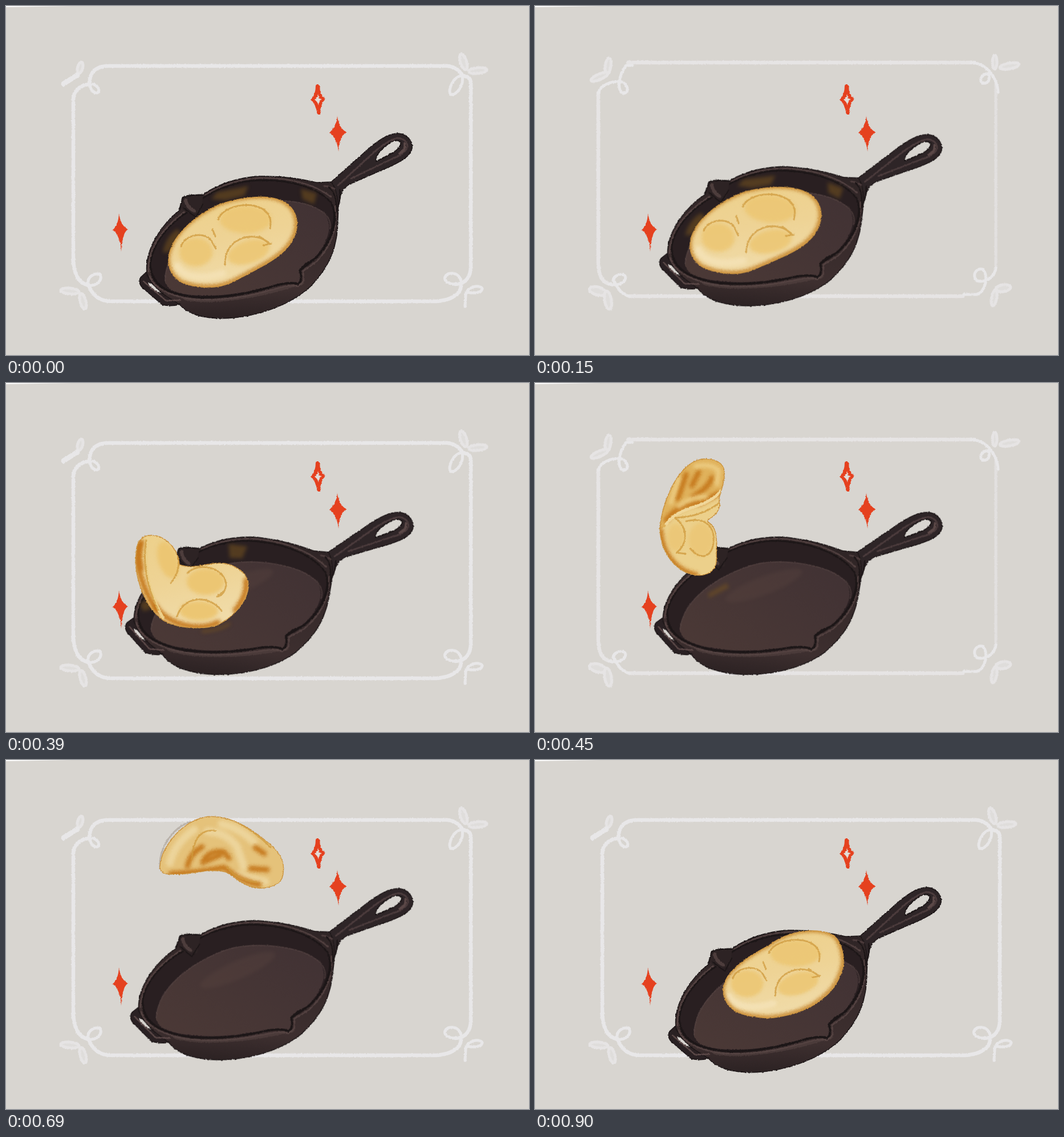
Write an HTML page that moves like this. It is 917 by 611 pixels and loops after 1050 ms.

```html
<!DOCTYPE html>
<html lang="en">
<head>
<meta charset="utf-8">
<title>Pancake flip</title>
<style>
html, body { margin: 0; width: 100%; height: 100%; overflow: hidden; background: #d8d5d0; }
svg { display: block; width: 917px; height: 611px; }
path, ellipse { stroke-linecap: round; stroke-linejoin: round; }
.line { fill: none; }

.border { fill: none; stroke: #e8e7e8; stroke-width: 6.5; filter: url(#chalk); }
.curl { stroke-width: 5; }
.petal { stroke-width: 5; stroke: #e6e4e4; fill: #dfdddb; }
.spark { fill: #e5411f; filter: url(#chalk); }

.soft { filter: url(#soft); }
.crust { fill: none; stroke: #cb9440; stroke-width: 1.5; }
.edge { fill: none; stroke: #c07a1c; stroke-width: 6; filter: url(#soft); }
.crease { fill: none; stroke: #cf9a3c; stroke-width: 3; opacity: .75; }
.toast { fill: none; stroke: #c4761a; stroke-width: 9; filter: url(#soft); }
.rim { fill: none; stroke: #5b4847; }
.dark { fill: none; stroke: #1c1617; }
.glow { fill: #76531f; opacity: .55; filter: url(#soft); }

.odd, .even, .pan, .flat, .slot { animation: 1050ms step-end infinite; }
.odd { animation-name: odd; }
.even { animation-name: even; }
.pan { animation-name: tilt; transform-origin: 661px 262px; }
.flat { animation-name: flat; }
.slot { animation-name: slot; animation-delay: calc(var(--at) * 150ms - 1050ms); }

@keyframes odd {
  0%, 28.571%, 57.142%, 85.714% { opacity: 1; }
  14.2857%, 42.857%, 71.428% { opacity: 0; }
}
@keyframes even {
  0%, 28.571%, 57.142%, 85.714% { opacity: 0; }
  14.2857%, 42.857%, 71.428% { opacity: 1; }
}
@keyframes tilt {
  0%, 71.428%, 100% { transform: rotate(0deg); }
  14.2857%, 57.142% { transform: rotate(4.4deg); }
  28.571% { transform: rotate(7.3deg); }
}
@keyframes flat {
  0% { opacity: 1; }
  28.571%, 100% { opacity: 0; }
}
@keyframes slot {
  0% { opacity: 1; }
  14.2857%, 100% { opacity: 0; }
}
</style>
</head>
<body>
<svg viewBox="0 0 917 611">
  <defs>
    <filter id="chalk" filterUnits="userSpaceOnUse" x="0" y="0" width="917" height="611" color-interpolation-filters="sRGB">
      <feTurbulence type="fractalNoise" baseFrequency=".35" numOctaves="2" seed="4"/>
      <feDisplacementMap in="SourceGraphic" scale="3" xChannelSelector="R" yChannelSelector="G"/>
    </filter>
    <filter id="soft" filterUnits="userSpaceOnUse" x="0" y="0" width="917" height="611" color-interpolation-filters="sRGB">
      <feGaussianBlur stdDeviation="3"/>
    </filter>
    <linearGradient id="batter" x1="0" y1="0" x2=".3" y2="1">
      <stop offset="0" stop-color="#edd08a"/>
      <stop offset=".55" stop-color="#eed395"/>
      <stop offset="1" stop-color="#f0dba8"/>
    </linearGradient>
    <linearGradient id="wall" x1="0" y1="0" x2="0" y2="1">
      <stop offset="0" stop-color="#2e2425"/>
      <stop offset=".8" stop-color="#3d2f2f"/>
      <stop offset="1" stop-color="#2c2223"/>
    </linearGradient>
    <linearGradient id="floor" x1="0" y1="1" x2="1" y2="0">
      <stop offset="0" stop-color="#4b3936"/>
      <stop offset="1" stop-color="#413234"/>
    </linearGradient>
    <path id="cake-flat" d="M285 440C290 405 325 370 375 347C420 332 470 328 495 348C512 362 514 385 505 405C490 440 440 460 400 482C370 497 335 494 310 485C292 475 284 462 285 440Z"/>
    <path id="cake-land" d="M330 400C333 370 375 343 410 325C445 297 500 292 525 308C540 322 543 350 540 362C532 395 515 412 490 428C465 442 445 448 410 452C385 450 355 447 343 433C333 422 329 410 330 400Z"/>
    <path id="cake-fold" d="M228 300C228 275 240 264 262 267C285 272 303 295 304 318C325 326 345 318 365 316C395 312 425 330 425 355C424 385 395 412 370 424C345 432 300 430 275 415C255 400 240 375 232 345C227 325 226 312 228 300Z"/>
    <path id="cake-rise" d="M285 135C300 130 330 133 332 155C334 180 318 200 324 212C322 235 300 236 303 243C322 255 318 275 318 310C318 330 300 339 280 336C245 330 220 295 219 255C222 215 245 150 285 135Z"/>
    <path id="cake-top" d="M270 185C273 150 310 105 355 99C395 97 430 120 460 145C485 165 491 185 484 207C477 222 450 228 430 222C410 216 395 200 385 196C355 188 320 203 290 200C275 200 269 195 270 185Z"/>
    <path id="cake-drop" d="M463 128C463 120 475 121 490 133C520 150 540 190 543 230C544 270 535 300 522 315C510 328 490 333 470 330C455 325 452 310 444 290C441 270 455 258 470 245C485 230 495 215 495 200C497 180 468 155 463 128Z"/>
    <clipPath id="in-flat"><use href="#cake-flat"/></clipPath>
    <clipPath id="in-land"><use href="#cake-land"/></clipPath>
    <clipPath id="in-fold"><use href="#cake-fold"/></clipPath>
    <clipPath id="in-rise"><use href="#cake-rise"/></clipPath>
    <clipPath id="in-top"><use href="#cake-top"/></clipPath>
    <clipPath id="in-drop"><use href="#cake-drop"/></clipPath>
    <g id="bubbles">
      <g class="soft" fill="#ecc672" opacity=".85">
        <ellipse cx="420" cy="374" rx="45" ry="24"/>
        <ellipse cx="333" cy="431" rx="29" ry="25"/>
        <ellipse cx="425" cy="431" rx="38" ry="20" transform="rotate(-18 425 431)"/>
      </g>
      <path class="soft line" d="M300 455C310 475 345 480 380 468" stroke="#f3e0b3" stroke-width="13"/>
      <path class="crease" d="M372 374C383 340 474 335 463 389M307 421C314 398 354 393 363 416L368 425M384 453C382 405 437 391 462 416L444 403M362 391L367 403M451 419L465 416"/>
    </g>
  </defs>

  <path d="M0 0H115L0 2Z" fill="#fff"/>

  <g class="odd"><g class="border">
    <path d="M118 450V165C118 148 130 139 145 137M147 128C150 113 160 105 180 105H765C782 103 795 111 800 122C812 123 815 128 815 135V455C815 475 805 487 788 487M798 490C797 505 780 515 755 517H185C160 517 150 503 145 489C125 485 118 465 118 440"/>
    <path class="curl" d="M145 137C160 135 167 148 160 152C150 153 145 140 147 128M800 122C803 140 790 156 780 155C773 148 785 122 800 122M788 487C768 487 765 474 775 469C790 465 800 475 798 490M145 489C140 475 155 466 165 470C170 480 158 491 145 489"/>
    <ellipse class="petal" cx="130" cy="108" rx="4.5" ry="10" transform="rotate(15 130 108)"/>
    <path d="M101 136L125 121" stroke-width="9"/>
    <ellipse class="petal" cx="802" cy="98" rx="5.5" ry="14" transform="rotate(-18 802 98)"/>
    <ellipse class="petal" cx="827" cy="113" rx="16" ry="5" transform="rotate(-5 827 113)"/>
    <ellipse class="petal" cx="112" cy="499" rx="16" ry="5" transform="rotate(5 112 499)"/>
    <ellipse class="petal" cx="135" cy="517" rx="5" ry="14" transform="rotate(-15 135 517)"/>
    <path class="curl" d="M805 526L806 505C810 490 832 487 835 495C833 503 820 503 808 501"/>
  </g></g>

  <g class="even"><g class="border">
    <path d="M111 450V152M163 99H770M750 508H165M111 450C111 472 118 484 132 487" stroke="#e6e4e4"/>
    <path d="M808 135V458" stroke="#e2e0df" stroke-width="5"/>
    <path class="curl" d="M111 152C115 139 130 132 150 132C165 137 165 152 155 153C143 148 146 122 160 104H171M765 99C793 101 810 125 812 151M797 119C785 117 778 127 784 135C795 137 799 128 795 118M808 458C807 474 790 485 775 481C766 473 772 458 785 461C796 472 790 500 775 505H752M165 508C150 505 145 492 137 480C140 469 155 467 159 474C158 487 145 490 130 487"/>
    <ellipse class="petal" cx="128" cy="105" rx="5" ry="14" transform="rotate(8 128 105)"/>
    <ellipse class="petal" cx="113" cy="124" rx="16" ry="5" transform="rotate(-24 113 124)"/>
    <ellipse class="petal" cx="806" cy="98" rx="4" ry="12"/>
    <ellipse class="petal" cx="832" cy="105" rx="17" ry="5" transform="rotate(-10 832 105)"/>
    <ellipse class="petal" cx="110" cy="499" rx="15" ry="7" transform="rotate(15 110 499)"/>
    <ellipse class="petal" cx="128" cy="515" rx="6" ry="16" transform="rotate(-10 128 515)"/>
    <ellipse class="petal" cx="821" cy="494" rx="13" ry="6" transform="rotate(-8 821 494)"/>
    <ellipse class="petal" cx="805" cy="511" rx="4.5" ry="14" transform="rotate(10 805 511)"/>
  </g></g>

  <g class="pan">
    <g filter="url(#chalk)">
      <path d="M247 465L236 475Q231 484 239 493L274 523Q290 527 306 522L315 510L290 495Z" fill="#2a2123" stroke="#1c1617" stroke-width="1.5"/>
      <path d="M570 308L640 246C658 232 672 223 687 223C704 224 713 237 712 249C709 263 694 271 676 280L602 312Q590 320 587 331L581 358L540 330Z" fill="#2e2527" stroke="#1c1617" stroke-width="1.5"/>
      <path d="M582 372C582 420 569 454 534 491C500 522 440 547 375 547C340 546 316 537 304 522C278 508 253 490 247 468C242 425 276 379 305 357L309 336Q314 330 345 330C372 312 405 300 445 298C490 297 522 304 545 309L570 308Q585 326 582 372Z" fill="url(#wall)" stroke="#1c1617" stroke-width="1.5"/>
      <path d="M253 453C256 415 290 378 318 361L338 341C370 318 410 306 445 305C500 304 546 318 570 344C584 370 570 415 541 443Q512 457 515 463Q521 479 512 487Q501 482 474 489C425 505 380 511 340 510C290 508 256 492 253 453Z" fill="#291f21" stroke="#1c1617" stroke-width="3"/>
      <path d="M279 484C278 430 328 382 395 352C445 334 518 338 548 356C575 370 572 405 542 440Q512 457 515 463Q521 479 512 485Q501 480 474 487C425 502 380 508 340 507C305 505 285 500 279 484Z" fill="url(#floor)"/>
      <path class="rim" d="M279 482C278 430 328 382 395 352C445 334 518 338 548 356C564 364 571 378 568 390" stroke-width="2" opacity=".6"/>
      <path class="rim" d="M250 465C248 420 279 386 312 361M349 331C374 315 410 302 446 301C500 300 540 312 570 334M577 350C583 390 570 420 545 447L521 464L522 481L512 491C500 486 478 494 465 497C420 510 370 517 325 513C285 508 258 492 252 473" stroke-width="2.5" opacity=".8"/>
      <path class="rim" d="M315 513C360 521 430 511 485 495L520 485" stroke-width="5" opacity=".5"/>
      <path class="dark" d="M256 470C261 491 290 507 340 510C390 511 430 502 474 489Q501 482 512 487Q521 479 515 463L541 443C567 419 579 387 576 362" stroke-width="3.5"/>
      <path d="M309 335Q325 330 346 330L342 362Q320 369 307 353Z" fill="#2d2324"/>
      <path class="dark" d="M304 356L310 336Q314 331 345 331M311 353L333 370L345 347" stroke-width="2"/>
      <path class="rim" d="M315 340Q317 352 330 359" stroke-width="6" opacity=".7"/>
      <path d="M249 484L255 486L272 502L262 499L253 494Z" fill="#d8d5d0"/>
      <path class="rim" d="M241 482L281 516L306 515" stroke-width="2.5"/>
      <path d="M649 269Q648 258 672 240Q685 232 692 238Q694 246 680 256Q660 267 649 272Z" fill="#d8d5d0" stroke="#1c1617" stroke-width="2"/>
      <path class="rim" d="M582 314L642 259Q667 236 687 231Q704 233 704 247Q698 260 678 267L605 302M576 320Q570 317 558 315" stroke-width="3" opacity=".65"/>
      <path class="rim" d="M699 241Q701 252 690 258" stroke-width="4"/>
      <path class="dark" d="M566 317Q580 328 580 360M585 322Q587 338 582 352" stroke-width="2.5"/>
    </g>
    <ellipse class="soft" cx="415" cy="387" rx="72" ry="16" fill="#5a4540" opacity=".35" transform="rotate(-28 415 387)"/>
    <g class="flat"><path class="glow" d="M360 338L370 326L425 315L418 332L385 340ZM517 320L545 328L540 347L520 338ZM275 432Q280 403 301 390L308 400L286 430Z"/></g>
    <g class="slot" style="--at:2"><path class="glow" d="M395 316H428L422 338L400 340ZM254 440L266 430L276 445L262 452Z"/></g>
    <g class="slot" style="--at:3"><path class="glow" d="M320 413L350 391L355 398L322 421Z"/></g>
    <g class="slot" style="--at:5"><path class="glow" d="M510 322L550 333L548 345L522 334Z"/></g>

    <g class="flat">
      <g filter="url(#chalk)">
        <use href="#cake-flat" fill="url(#batter)"/>
        <g clip-path="url(#in-flat)">
          <use href="#bubbles"/>
          <use href="#cake-flat" class="edge" x="-1" y="-1"/>
        </g>
        <use href="#cake-flat" class="crust"/>
      </g>
    </g>
  </g>

  <g class="slot" style="--at:6">
    <g filter="url(#chalk)">
      <use href="#cake-land" fill="url(#batter)"/>
      <g clip-path="url(#in-land)">
        <use href="#bubbles" transform="translate(435 375) scale(.97 .93) translate(-398 -413)"/>
        <use href="#cake-land" class="edge" x="-1" y="-1"/>
      </g>
      <use href="#cake-land" class="crust"/>
    </g>
  </g>

  <g class="slot" style="--at:2">
    <path d="M345 435Q374 433 391 422" class="line soft" stroke="#76531f" stroke-width="5" opacity=".6"/>
    <g filter="url(#chalk)">
      <use href="#cake-fold" fill="url(#batter)"/>
      <g clip-path="url(#in-fold)">
        <g class="soft" fill="#ecc673">
          <ellipse cx="284" cy="310" rx="17" ry="33" transform="rotate(-18 284 310)"/>
          <ellipse cx="350" cy="348" rx="33" ry="23"/>
          <ellipse cx="338" cy="399" rx="34" ry="17"/>
        </g>
        <path class="toast" d="M235 280C224 315 239 360 264 398" stroke="#d99a3d" stroke-width="12"/>
        <path class="toast" d="M237 279Q230 299 236 325M261 390C285 425 340 436 372 419M421 345Q424 371 402 398" stroke-width="5"/>
        <path class="line" d="M251 273C240 318 250 366 275 411" stroke="#ecd08b" stroke-width="5"/>
        <path class="crease" d="M246 275C239 315 246 355 267 398M299 294Q310 325 289 350M318 333C337 313 382 322 386 352Q384 371 370 374L381 365M300 409C309 374 355 368 378 399"/>
      </g>
      <use href="#cake-fold" class="crust"/>
    </g>
  </g>

  <g class="slot" style="--at:3">
    <g filter="url(#chalk)">
      <use href="#cake-rise" fill="#ecd08b"/>
      <g clip-path="url(#in-rise)">
        <path d="M215 258L220 200L270 125H340L331 180Q310 206 270 220Q237 230 229 251Z" fill="#e0b25c"/>
        <path class="toast" d="M265 160L250 203M287 156L275 180M310 166Q305 183 277 199M230 240Q251 212 290 210L323 193" stroke="#c06a14" stroke-width="8"/>
        <path class="soft line" d="M252 166L238 210M281 146Q308 140 322 153L319 177M252 216Q273 199 300 199" stroke="#edcf87" stroke-width="7"/>
        <path class="line" d="M230 247Q244 227 279 217Q315 205 325 189" stroke="#f0d79a" stroke-width="5"/>
        <ellipse class="soft" cx="291" cy="274" rx="22" ry="29" fill="#ebc778"/>
        <ellipse class="soft" cx="247" cy="270" rx="15" ry="24" fill="#ebc778"/>
        <path class="crease" d="M246 237C271 255 266 284 248 297L264 299M265 242C304 233 315 257 313 277C312 301 294 314 272 290M324 209Q293 234 247 236"/>
        <path class="toast" d="M220 258C222 297 246 329 282 336" stroke-width="5"/>
      </g>
      <use href="#cake-rise" class="crust"/>
    </g>
  </g>

  <g class="slot" style="--at:4">
    <g filter="url(#chalk)">
      <path class="line" d="M270 190C267 154 292 119 323 108" stroke="#b9b2aa" stroke-width="3"/>
      <use href="#cake-top" fill="#e5c27a"/>
      <g clip-path="url(#in-top)">
        <path class="soft line" d="M287 180Q296 145 330 122M378 112Q410 119 435 144M353 125Q386 126 405 152L417 187M407 201L455 213" stroke="#ecd49b" stroke-width="14"/>
        <path class="toast" d="M318 186Q324 162 344 152M345 180Q354 157 382 161L391 172" stroke="#cb8833" stroke-width="9"/>
        <path class="toast" d="M429 190L458 192M437 153L453 164M352 176L376 166" stroke="#bd6d1c" stroke-width="8"/>
        <path class="toast" d="M289 199Q335 198 382 188Q413 214 444 218" stroke="#d9a04a" stroke-width="4"/>
        <path class="crease" d="M326 173Q330 118 367 124M388 187Q401 209 439 214M399 105Q437 125 464 153"/>
      </g>
      <use href="#cake-top" class="crust"/>
    </g>
  </g>

  <g class="slot" style="--at:5">
    <g filter="url(#chalk)">
      <use href="#cake-drop" fill="#e7c981"/>
      <g clip-path="url(#in-drop)">
        <path class="soft line" d="M512 180Q525 230 509 296M470 278Q458 294 474 315" stroke="#ecd49a" stroke-width="12"/>
        <ellipse class="soft" cx="503" cy="230" rx="12" ry="25" fill="#ddb35d" transform="rotate(15 503 230)"/>
        <path class="toast" d="M492 139Q529 169 537 228L533 259" stroke-width="4"/>
        <path class="crease" d="M472 139Q482 160 508 170Q528 204 527 241Q526 286 516 313M498 198L486 248M519 221Q512 252 488 251M515 261Q511 284 495 292M451 277Q463 260 479 274"/>
        <path class="line" d="M529 181Q546 230 525 296" stroke="#edcf87" stroke-width="4"/>
        <path class="toast" d="M534 203Q541 220 536 241" stroke-width="4"/>
      </g>
      <use href="#cake-drop" class="crust"/>
    </g>
  </g>

  <g class="spark">
    <path d="M581 193Q583 213 597 221Q585 228 583 254Q580 231 567 222Q579 212 581 193Z"/>
    <path d="M198 363Q201 385 214 391Q204 396 202 430Q200 401 187 392Q197 384 198 363Z"/>
    <path d="M543 139Q547 135 550 139Q550 155 560 163Q551 171 551 190H546Q543 171 534 164Q543 156 543 139Z"/>
    <path d="M547 154Q548 161 553 164Q548 167 548 174Q546 167 541 164Q546 161 547 154Z" fill="#e3ddd8"/>
  </g>
</svg>
</body>
</html>
```
